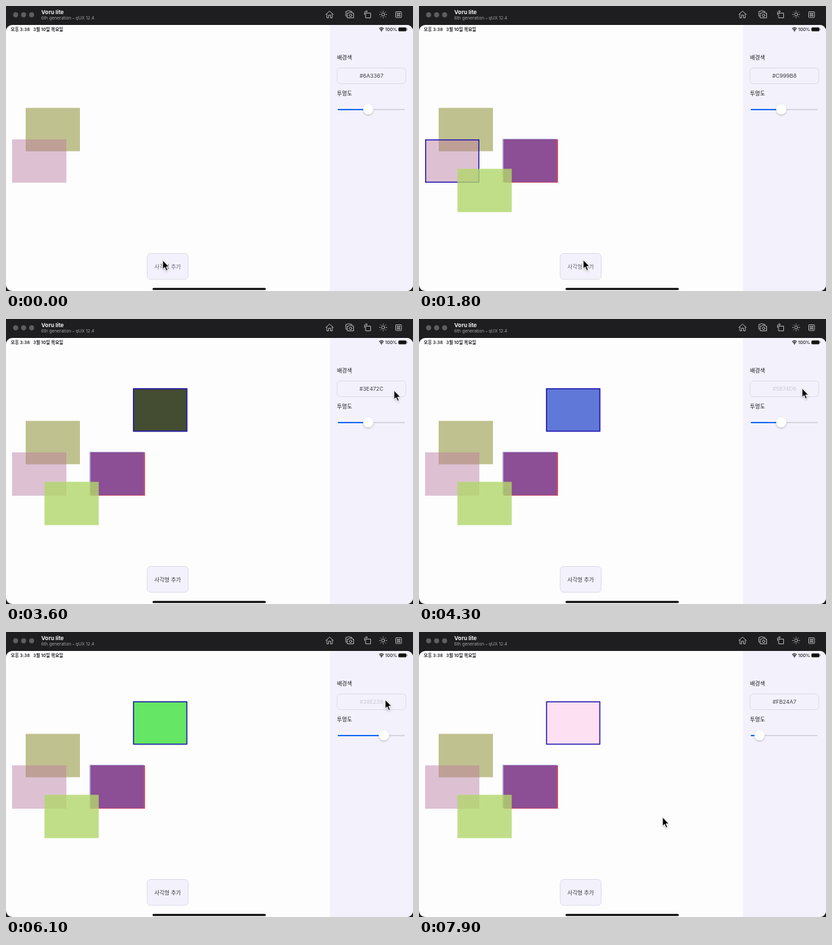
An HTML page for the animation above (8000 ms loop, 600x421 px).

```html
<!DOCTYPE html>
<html lang="ko">
<head>
<meta charset="utf-8">
<title>Rectangle editor</title>
<style>
  html, body { margin: 0; width: 100%; height: 100%; overflow: hidden; background: #1e1d1f; }
  svg { display: block; width: 600px; height: 421px; }
  text { font-family: Inter, "Noto Sans CJK KR", "Noto Sans CJK", sans-serif; fill: #1c1c20; }
  .mid { text-anchor: middle; }
  .icons { fill: none; stroke: #b9b9ba; stroke-width: .95; stroke-linecap: round; stroke-linejoin: round; }
  .button { fill: #f3f2fc; stroke: #d9d8e6; stroke-width: .9; }
  .outline { fill: none; stroke: #2418b2; stroke-width: 1.5; }
</style>
</head>
<body>
<svg viewBox="0 0 600 421">
  <defs>
    <filter id="soft" x="-50%" y="-50%" width="200%" height="220%">
      <feDropShadow dx="0" dy="1.3" stdDeviation="1.4" flood-opacity=".24"/>
    </filter>
    <clipPath id="screen"><rect y="28" width="600" height="393" rx="9"/></clipPath>
  </defs>

  <rect width="600" height="421" fill="#1e1d1f"/>
  <g fill="#5f5e60">
    <circle cx="14.2" cy="13" r="3.7"/><circle cx="26" cy="13" r="3.7"/><circle cx="37.8" cy="13" r="3.7"/>
  </g>
  <text x="52" y="12" font-size="8.2" font-weight="700" style="fill:#f0f0f0">Voru lite</text>
  <text x="52" y="20" font-size="6.4" style="fill:#a3a3a4">6th generation – qUX 12.4</text>

  <g class="icons">
    <path d="M471.5 12.5 477 7.5l5.500 5M473 11.500v6h2.600v-4h2.800v4h2.600v-6"/>
    <path d="M502.500 15h-1.500v-7h2l.8-1h3l.8 1h2.400v1.500M503.500 10.500h2l1-1.300h3l1 1.300h2v7h-9z"/>
    <circle cx="508" cy="13.800" r="1.900"/>
    <path d="M530.500 10.500h7v7h-7zM528.500 12.500v-2.500q0-2 2-2h2M531 6.500l1.500 1.500-1.500 1.500"/>
    <circle cx="556" cy="12.500" r="2.300"/>
    <path id="rays"/>
    <rect x="574.500" y="8.500" width="8.500" height="8.500" rx=".8"/>
    <path stroke-width=".8" d="M577.600 11.600h2.400v2.400h-2.400zM577.600 11.600h-1v-1h1zM580 11.600h1v-1h-1zM577.600 14h-1v1h1zM580 14h1v1h-1z"/>
  </g>

  <g clip-path="url(#screen)">
    <rect y="28" width="600" height="393" fill="#fdfdfd"/>
    <rect x="477.500" y="28" width="123" height="393" fill="#f3f2fc"/>
  </g>

  <g font-size="6.500" font-weight="600">
    <text x="7" y="36.800">오후 3:38</text>
    <text x="40" y="36.800">3월 10일 목요일</text>
    <text x="559" y="36.900" font-weight="500">100%</text>
  </g>
  <g fill="none" stroke="#111" stroke-width="1.200">
    <path d="M550.200 33.500q3.300-2.800 6.600 0M551.400 35.200q2.100-1.700 4.200 0"/>
    <circle cx="553.500" cy="36.600" r=".4"/>
  </g>
  <rect x="578.500" y="31.700" width="11.800" height="5.600" rx="1.600" fill="#111" stroke="#777" stroke-width=".5"/>
  <rect x="591" y="33.500" width=".8" height="2" fill="#777"/>

  <g id="shapes"></g>

  <g font-size="8" font-weight="500">
    <text x="488" y="79.300">배경색</text>
    <text x="488" y="132.300">투명도</text>
  </g>
  <rect class="button" x="488" y="91.500" width="101.500" height="23.300" rx="5"/>
  <text id="code" class="mid" x="538.700" y="106" font-size="8"></text>

  <rect x="489" y="151.900" width="99" height="2.100" rx="1" fill="#d7d6df"/>
  <rect id="fill" x="489" y="151.900" height="2.100" rx="1" fill="#0d6bf5"/>
  <circle id="thumb" cy="152.500" r="7.500" fill="#fff" filter="url(#soft)"/>

  <rect class="button" x="208.200" y="365.500" width="60.300" height="38.300" rx="5"/>
  <text id="add" class="mid" x="238.400" y="387.700" font-size="8">사각형 추가</text>
  <rect x="216" y="416.500" width="167" height="3" rx="1.500" fill="#050505"/>

  <path id="cursor" d="M0 0V13.200L3 10.500 5.100 15.700 7.400 14.700 5.200 9.700H9.400Z" fill="#050505" stroke="#fff" stroke-width=".9" stroke-linejoin="round" filter="url(#soft)"/>
</svg>

<script>
const LOOP = 8000, STEP = 100;
const $ = id => document.getElementById(id);

// [time, x, y]
const pointer = [
  [0, 231, 375.500], [300, 231, 376], [700, 60, 226], [1000, 55, 228],
  [1200, 245, 365.500], [1300, 243, 374], [1900, 242, 375], [2200, 236, 205.500],
  [2600, 230, 140], [3000, 230, 138], [3400, 562, 102], [3600, 572, 105.500],
  [3900, 566, 103], [4600, 564, 102], [5000, 534, 152], [5100, 533, 152.500],
  [5200, 533, 152.500], [5500, 569, 153], [5600, 577, 153], [5800, 556, 153],
  [6100, 559, 100], [6700, 560, 101], [6900, 557, 152], [7000, 557, 153],
  [7300, 577, 153], [7600, 502, 153], [7700, 502, 154], [7900, 359, 273.500]
];
// [time, thumb centre]
const slider = [
  [0, 534], [5200, 534], [5500, 570], [5600, 578], [5800, 557],
  [7000, 557], [7300, 578], [7600, 502]
];
// [time, shown code]
const codes = [
  [0, "#6A3367"], [1000, ""], [1300, "#C999B8"], [2900, ""], [3100, "#3E472C"],
  [3800, "#A65D21"], [4100, "#5B74D6"], [4400, "#38E238"],
  [6200, "#D8A63C"], [6500, "#4C8FB1"], [6700, "#FB24A7"]
];
const addTimes = [1400, 1500, 1700, 1900];
const pickPink = 1000, pickTop = 2900, dragStart = 5200;

function tween(keys, t, col) {
  let i = keys.length - 1;
  while (i > 0 && keys[i][0] > t) i--;
  const a = keys[i], b = keys[i + 1];
  if (!b) return a[col];
  const p = (t - a[0]) / (b[0] - a[0]);
  return a[col] + (b[col] - a[col]) * p * p * (3 - 2 * p);
}

const latest = (keys, t) => keys.filter(k => k[0] <= t).pop()[1];

function make(tag, attrs) {
  const el = document.createElementNS("http://www.w3.org/2000/svg", tag);
  for (const k in attrs) el.setAttribute(k, attrs[k]);
  return $("shapes").appendChild(el);
}

const box = (x, y, fill, w = 80, h = 64) => make("rect", { x, y, width: w, height: h, fill });
const frame = (x, y) => make("rect", { x: x + .75, y: y + .75, width: 78.500, height: 62.500, class: "outline" });
const show = (el, on) => el.style.display = on ? "" : "none";

box(29, 150.500, "#bfc18f");
box(9, 197, "rgba(201,153,184,.6)");
box(29, 197, "#bfa096", 60, 17.500);
const pinkFrame = frame(9, 197);
const added = [
  box(125, 197, "#e0505f"),
  box(123.300, 196.300, "rgba(92,78,180,.63)"),
  box(56.700, 240.500, "rgba(178,216,107,.8)"),
  box(187.300, 102.400, "#3e472c")
];
const top4 = added[3];
const topFrame = frame(187.300, 102.400);

let rays = "";
for (let i = 0; i < 8; i++) {
  const c = Math.cos(i * Math.PI / 4), s = Math.sin(i * Math.PI / 4);
  rays += `M${556 + 4.300 * c} ${12.500 + 4.300 * s}L${556 + 5.300 * c} ${12.500 + 5.300 * s}`;
}
$("rays").setAttribute("d", rays);

function draw(t) {
  const x = tween(slider, t, 1);
  $("thumb").setAttribute("cx", x);
  $("fill").setAttribute("width", x - 489);
  $("cursor").setAttribute("transform", `translate(${tween(pointer, t, 1)} ${tween(pointer, t, 2)})`);

  const pressed = codes.some(([at]) => at >= 3800 && t >= at - STEP && t < at);
  $("code").textContent = latest(codes, t);
  $("code").style.fill = pressed ? "#c9c8d3" : "#3f3f49";
  const adding = t < STEP || addTimes.some(at => t >= at - STEP && t < at);
  $("add").style.fill = adding ? "#66656d" : "#35353d";

  added.forEach((el, i) => show(el, t >= addTimes[i]));
  show(pinkFrame, t >= pickPink && t < pickTop);
  show(topFrame, t >= pickTop);
  top4.setAttribute("fill", t < 3800 ? "#3e472c" : latest(codes, t));
  const alpha = t < dragStart ? .97 : Math.min(1, (x - 491) / 86);
  top4.setAttribute("fill-opacity", alpha);
}

const start = performance.now();
function tick() {
  const t = (performance.now() - start) % LOOP;
  draw(Math.floor(t / STEP) * STEP);
  requestAnimationFrame(tick);
}
tick();
</script>
</body>
</html>
```
